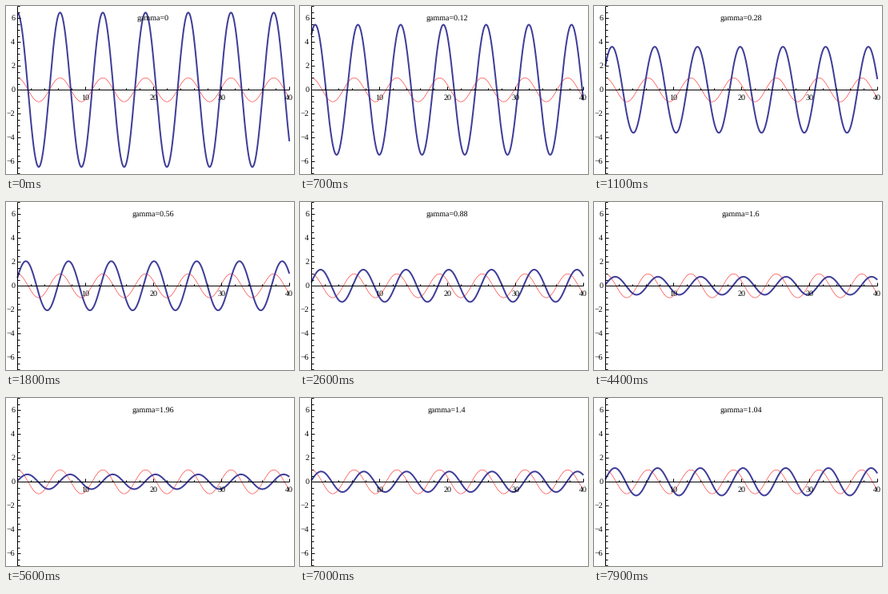
A matplotlib script for the animation above (8 s loop, 360 by 211 pixels).

```python
import numpy as np
import matplotlib.pyplot as plt
from matplotlib.animation import FuncAnimation

W, H, DPI = 360, 211, 100
PX = 72 / DPI               # points per pixel
DETUNE, FORCE = 0.188, 1.215
STEP = 0.04

plt.rcParams["font.family"] = "Liberation Serif"
plt.rcParams["text.hinting"] = "none"

fig = plt.figure(figsize=(W / DPI, H / DPI), dpi=DPI, facecolor="white")
ax = fig.add_axes([0, 0, 1, 1])
ax.set_xlim(0, W)
ax.set_ylim(H, 0)
ax.axis("off")


def px(t):
    return 14.2 + 8.5 * t


def py(v):
    return 105.2 - 15 * v


def line(xs, ys, color="black", width=1.0, z=5):
    return ax.plot(xs, ys, color=color, lw=width * PX, zorder=z,
                   solid_capstyle="butt")[0]


def label(x, y, text, align="center"):
    return ax.text(x, y, text, ha=align, va="baseline", fontsize=10 * PX,
                   color="black", zorder=6)


def draw_axes():
    line([px(0), px(0)], [0, H])
    line([px(0), px(40)], [py(0), py(0)])
    for t in range(2, 41, 2):
        size = 4 if t % 10 == 0 else 2.5
        line([px(t)] * 2, [py(0), py(0) - size])
        if t % 10 == 0:
            label(px(t), 117.9, str(t))
    for k in range(-14, 15):
        v = k / 2
        major = k % 4 == 0
        line([px(0), px(0) + (4 if major else 2.5)], [py(v)] * 2)
        if major:
            name = str(int(v)).replace("-", "\u2212")
            label(11.2, py(v) + 2.8, name, "right")


def gamma_at(i):
    """Hold at zero, climb to 2, rest one step, then come back down."""
    k = i - 4 if i <= 54 else 105 - i
    return STEP * max(k, 0)


def caption_text(i):
    if i < 4:
        return "gamma=0"
    text = f"{gamma_at(i):.2f}".rstrip("0")
    return "gamma=" + text


t = np.linspace(0, 40, 900)
draw_axes()
line(px(t), py(np.cos(t)), (1, 0, 0), 0.5, 2)
wave = line(px(t), py(0 * t), (0.247, 0.24, 0.6), 2.0, 3)
caption = label(183.6, 18.2, "")


def update(i):
    g = gamma_at(i)
    amp = FORCE / np.hypot(DETUNE, g)
    lag = np.arctan2(g, DETUNE)
    wave.set_ydata(py(amp * np.cos(t - lag)))
    caption.set_text(caption_text(i))
    return wave, caption


anim = FuncAnimation(fig, update, frames=80, interval=100, repeat=True,
                     repeat_delay=0, init_func=lambda: update(0))
plt.show()
```
